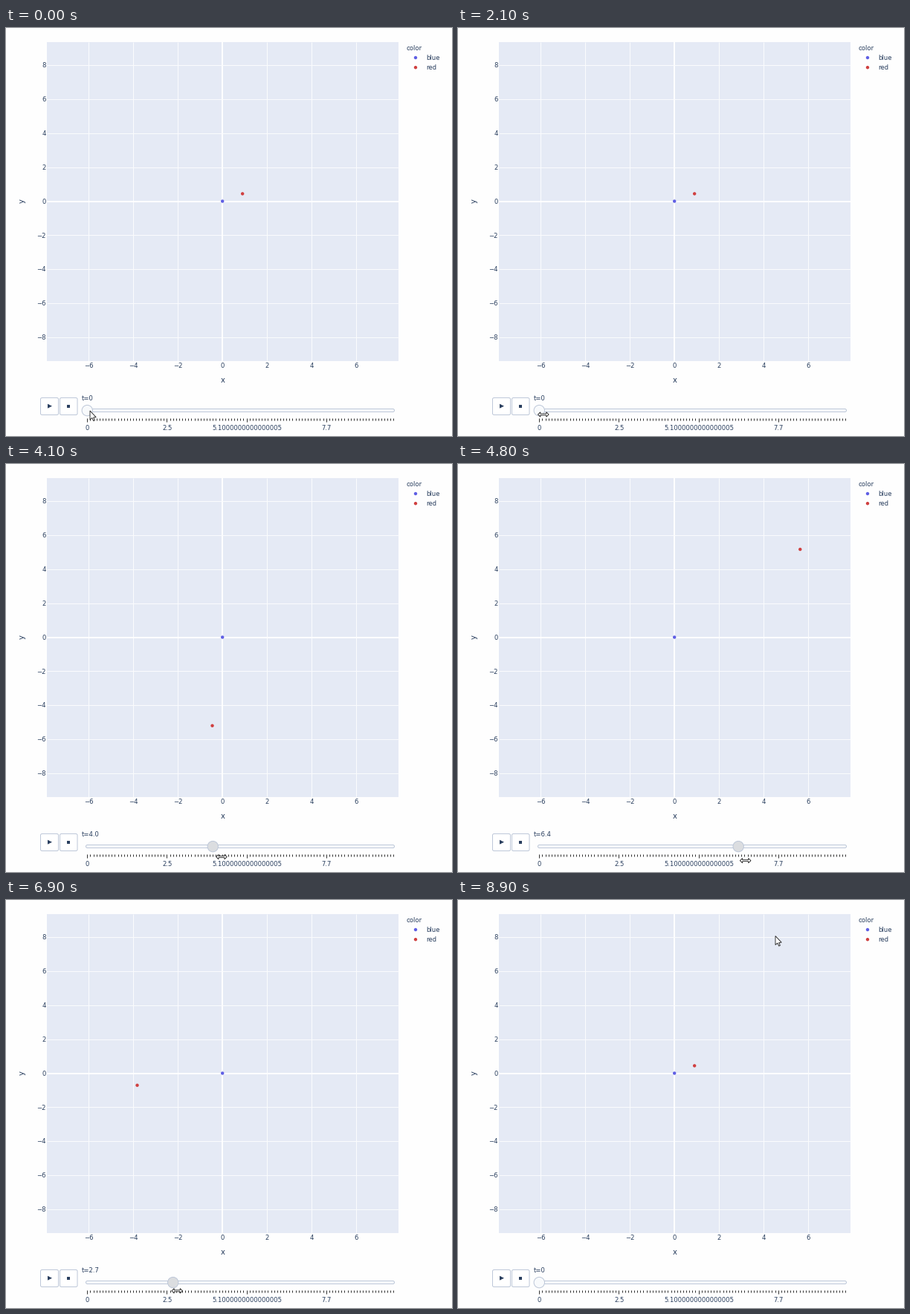
A matplotlib script that plays this animation: 600 px wide and 550 px high, repeating every 9000 ms.

```python
import numpy as np
import matplotlib.pyplot as plt
from matplotlib.animation import FuncAnimation
from matplotlib.patches import Circle, FancyBboxPatch, Polygon, Rectangle

W, H, DPI = 600, 550, 100
FRAMES, INTERVAL = 90, 100
PX = 72 / DPI  # points per pixel

INK, EDGE, PLOT_BG, GRID = "#2a3f5f", "#bec8d9", "#e5eaf5", "#fafbfd"
BLUE, RED = "#5f5fe4", "#d04040"
IDLE, PRESSED = "#f8fafc", "#dbdde0"

X0, Y0 = 291.2, 233.5      # pixel position of the data origin
UX, UY = 30.02, 22.95      # pixels per data unit
LEFT, TOP, RIGHT, BOTTOM = 55, 18.5, 528, 448.5
TRACK_X, TRACK_Y, STEP = 109.3, 515.6, 4.121

plt.rcParams["font.family"] = "DejaVu Sans"
fig = plt.figure(figsize=(W / DPI, H / DPI), dpi=DPI, facecolor="#fefefe")
ax = fig.add_axes([0, 0, 1, 1])
ax.set_xlim(0, W)
ax.set_ylim(H, 0)
ax.axis("off")


def text(x, y, s, ha="left", size=8.5, **kw):
    return ax.text(x, y, s, ha=ha, va=kw.pop("va", "baseline"),
                   fontsize=size * PX, color=INK, **kw)


def line(xs, ys, color, width, **kw):
    return ax.plot(xs, ys, color=color, lw=width * PX,
                   solid_capstyle="butt", **kw)[0]


def dot(x, y, color):
    return ax.add_patch(Circle((x, y), 2.2, fc=color, ec="none", zorder=4))


def box(x, y, w, h, fill):
    ax.add_patch(FancyBboxPatch(
        (x, y), w, h, boxstyle="round,pad=0,rounding_size=2",
        fc=fill, ec=EDGE, lw=PX, zorder=2))


def draw_plot():
    area = ax.add_patch(Rectangle((LEFT, TOP), RIGHT - LEFT, BOTTOM - TOP,
                                  fc=PLOT_BG, ec="none", zorder=0))
    for v in range(-8, 9, 2):
        name = str(v).replace("-", "\u2212")
        color, width = (GRID, 1) if v else ("white", 2)
        x, y = X0 + v * UX, Y0 - v * UY
        line([LEFT, RIGHT], [y, y], color, width, zorder=1)
        text(54, y + 3.2, name, "right")
        if abs(v) < 8:
            line([x, x], [TOP, BOTTOM], color, width, zorder=1)
            text(x, 458, name, "center")
    text(X0, 478, "x", "center", 10)
    text(22, Y0, "y", "center", 10, va="center", rotation=90)
    return area


def draw_legend():
    text(538.5, 30, "color")
    for y, name, color in ((40, "blue", BLUE), (53.2, "red", RED)):
        dot(551, y, color)
        text(565, y + 3.2, name)


def draw_controls():
    box(46.5, 498.5, 24, 23, "white")
    box(72.5, 498.5, 23.5, 23, "white")
    ax.add_patch(Polygon([(56, 506.7), (62, 509.7), (56, 512.7)],
                         fc=INK, ec="none", zorder=3))
    ax.add_patch(Rectangle((82, 507.7), 4.4, 4.4, fc=INK, ec="none", zorder=3))
    box(107.5, 513.5, 415, 4, IDLE)
    for i in range(101):
        x = TRACK_X + i * STEP
        major = i % 26 == 0
        line([x, x], [526, 531 if major else 529], "#333333", 1, zorder=2)
    for i, s in enumerate(("0", "2.5", "5.1000000000000005", "7.7")):
        text(TRACK_X + 26 * i * STEP + 0.3, 542.4, s, "center")


area = draw_plot()
draw_legend()
draw_controls()
dot(X0, Y0, BLUE)
red = dot(X0, Y0, RED)
red.set_clip_path(area)
handle = ax.add_patch(Circle((TRACK_X, TRACK_Y), 7.2, fc=IDLE, ec=EDGE,
                             lw=PX, zorder=5))
readout = text(102, 502.3, "t=0")

ARROW = np.array([(0, 0), (0, 12), (2.8, 9.5), (4.7, 13.6), (6.4, 12.8),
                  (4.7, 8.9), (8.2, 8.7)])
HALF = np.array([(-7.3, 0), (-4, -3.2), (-4, -1)])
RESIZE = np.vstack([HALF, HALF[::-1] * (-1, 1), HALF * (-1, -1),
                    HALF[::-1] * (1, -1)])
CROSS = np.array([(-8.3, 0), (8.3, 0), (np.nan, np.nan), (0, -8.3), (0, 8.3)])


def pointer(shape):
    return ax.add_patch(Polygon(shape, fc="white", ec="#1a1a1a", lw=0.85 * PX,
                                joinstyle="miter", zorder=9))


arrow, resize = pointer(ARROW), pointer(RESIZE)
cross = line(*CROSS.T, "black", 1.6, zorder=9)

GRAB, RELEASE = 21, 76     # frames between which the pointer is on the handle


def bezier(u, *points):
    a, b, c, d = np.array(points)
    v = 1 - u
    return v**3 * a + 3 * v * v * u * b + 3 * v * u * u * c + u**3 * d


def slider_step(n):
    pull = 92 * np.clip((n - 25) / 30, 0, 1) ** 1.3
    back = 90 - 5.17 * (n - 57)
    return int(round(max(0, min(pull, back))))


def mouse(n):
    if n < 7:
        return bezier(min(n / 6, 1), (113, 516), (80, 545), (20, 520), (56, 503))
    if n < GRAB:
        return bezier((n - 7) / (GRAB - 7),
                      (56, 503), (37.5, 206), (200, 206), (115, 521))
    if n <= RELEASE:
        step = slider_step(n)
        lead = 5.5 + 6.3 * np.sin(np.pi * np.clip((n - 23) / 32, 0, 1))
        return np.array([TRACK_X + step * STEP + lead, 521 + 0.21 * step])
    u = ((n - RELEASE) / (FRAMES - 1 - RELEASE)) ** 0.8
    return bezier(u, (115, 521), (290, 280), (475, 65), (427, 48.5))


def spiral(t):
    r = 1 + t + 0.25 * (1 - np.exp(-t / 2))
    a = 0.455 + t + 0.17 * (1 - np.exp(-3 * t))
    return X0 + UX * r * np.cos(a), Y0 - UY * r * np.sin(a)


def update(n):
    step = slider_step(n)
    t = max(step - 1, 0) / 10
    red.center = spiral(t)
    handle.center = (TRACK_X + step * STEP, TRACK_Y)
    handle.set_facecolor(PRESSED if 25 <= n <= RELEASE else IDLE)
    readout.set_text(f"t={t:.1f}" if step else "t=0")

    x, y = spot = mouse(n)
    dragging = GRAB <= n <= RELEASE
    over_plot = LEFT < x < RIGHT and TOP < y < BOTTOM and n < FRAMES - 1
    resize.set_visible(dragging)
    cross.set_visible(over_plot and not dragging)
    arrow.set_visible(not dragging and not over_plot)
    resize.set_xy(RESIZE + spot)
    arrow.set_xy(ARROW + spot)
    cross.set_data(*(CROSS + spot).T)
    return red, handle, readout, resize, cross, arrow


anim = FuncAnimation(fig, update, frames=FRAMES, interval=INTERVAL,
                     init_func=lambda: update(0), repeat=True, repeat_delay=0)
plt.show()
```
